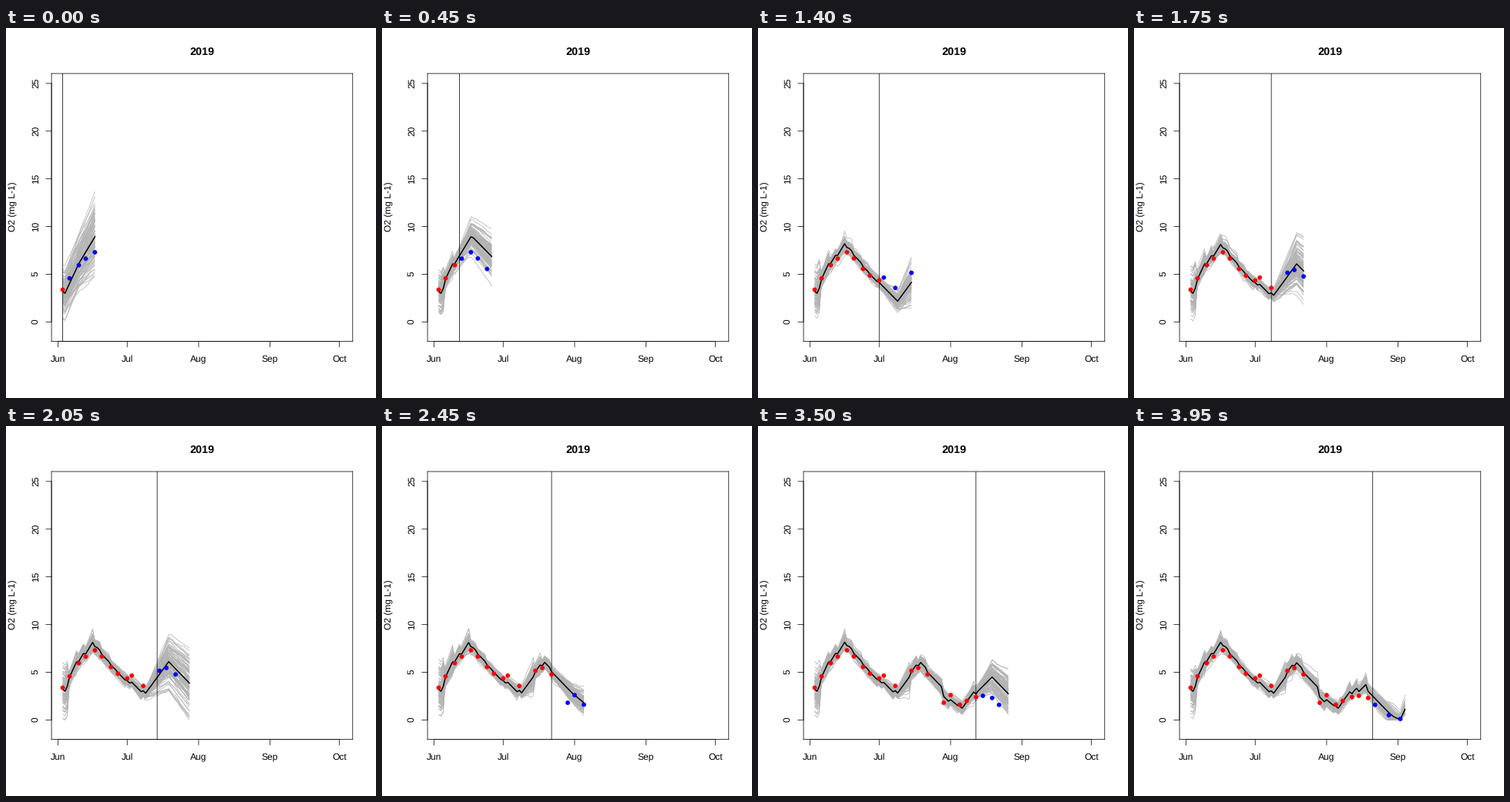
Write a matplotlib script that moves like this. It is 480x480 px and loops after 4000 ms.

```python
import numpy as np
import matplotlib.pyplot as plt
from matplotlib.animation import FuncAnimation
from matplotlib.collections import LineCollection
from matplotlib.lines import Line2D

plt.rcParams.update({"font.family": "Liberation Sans", "font.size": 12,
                     "text.hinting": "none", "path.snap": False})

SIZE, DPI = 480, 72
FRAMES, INTERVAL = 80, 50
LEFT, RIGHT, TOP, BOTTOM = 59.04, 449.76, 59.04, 406.56
THIN, TICK = 0.75, 7.2

# Days are counted from 1 June.
START, HORIZON, MEMBERS = 2, 14, 100
X0, X1, Y0, Y1 = START - 4.84, START + 125.84, -2.04, 26.04
MONTHS = {"Jun": 0, "Jul": 30, "Aug": 61, "Sep": 92, "Oct": 122}

OBS = {2: 3.38, 5: 4.57, 9: 5.95, 12: 6.63, 16: 7.3, 19: 6.65, 23: 5.55,
       26: 4.85, 30: 4.35, 32: 4.65, 37: 3.57, 44: 5.15, 47: 5.45, 51: 4.77,
       58: 1.8, 61: 2.6, 65: 1.6, 68: 2.0, 72: 2.4, 75: 2.53, 79: 2.3,
       82: 1.58, 88: 0.5, 93: 0.1}

# Model phases: last day and daily change in oxygen.
PHASES = [(3, -0.2), (9, 0.52), (16, 0.4), (17, -0.1), (38, -0.245),
          (48, 0.33), (60, -0.25), (66, -0.2), (73, 0.33), (79, 0.24),
          (93, -0.25), (96, 0.52)]
START_MEAN, START_SD, OBS_SD = 3.2, 1.15, 0.42


def simulate(now):
    """Ensemble Kalman filter up to now, free forecast after; rows are days."""
    rng = np.random.default_rng(now)

    def noise(sd):
        z = rng.standard_normal(MEMBERS)
        return sd * (z - z.mean())

    x = np.maximum(START_MEAN + noise(START_SD), 0)
    bias, rows = noise(1), [x]
    for day in range(START + 1, now + HORIZON + 1):
        rate = next(r for end, r in PHASES if day <= end)
        growth = 0.11 if rate > 0 else 0.035
        x = x + rate + growth * bias + noise(0.07)
        if day in OBS and day <= now:
            gain = x.var() / (x.var() + OBS_SD**2)
            x = x + gain * (OBS[day] + noise(OBS_SD) - x)
            bias = noise(1)
        x = np.maximum(x, 0)
        rows.append(x)
    return np.array(rows)


def px(day):
    return LEFT + (day - X0) / (X1 - X0) * (RIGHT - LEFT)


def py(value):
    return BOTTOM - (value - Y0) / (Y1 - Y0) * (BOTTOM - TOP)


def rule(xa, ya, xb, yb):
    fig.add_artist(Line2D([xa / SIZE, xb / SIZE], [1 - ya / SIZE, 1 - yb / SIZE],
                          color="black", lw=THIN))


def label(x, y, text, **kw):
    fig.text(x / SIZE, 1 - y / SIZE, text, ha="center", va="baseline",
             rotation_mode="anchor", **kw)


fig = plt.figure(figsize=(SIZE / DPI, SIZE / DPI), dpi=DPI, facecolor="white")
ax = fig.add_axes([LEFT / SIZE, 1 - BOTTOM / SIZE,
                   (RIGHT - LEFT) / SIZE, (BOTTOM - TOP) / SIZE])
ax.set(xlim=(X0, X1), ylim=(Y0, Y1), xticks=[], yticks=[])
for spine in ax.spines.values():
    spine.set_linewidth(THIN)

rule(px(0), BOTTOM, px(122), BOTTOM)
for name, day in MONTHS.items():
    rule(px(day), BOTTOM, px(day), BOTTOM + TICK)
    label(px(day), 432.8, name)
rule(LEFT, py(0), LEFT, py(25))
for v in range(0, 26, 5):
    rule(LEFT, py(v), LEFT - TICK, py(v))
    label(41.8, py(v) - 0.7, str(v), rotation=90)
label(13, (TOP + BOTTOM) / 2 - 0.7, "O2 (mg L-1)", rotation=90)
label((LEFT + RIGHT) / 2, 35, "2019", fontsize=14.4, fontweight="bold")

members = LineCollection([], colors="#b3b3b3", linewidths=THIN, zorder=2)
ax.add_collection(members, autolim=False)
now_line = ax.axvline(START, color="black", lw=THIN, zorder=3)
mean_line, = ax.plot([], [], color="black", lw=1.5, zorder=3)
dots = ax.scatter([], [], s=5.8**2, lw=0, zorder=4)


def update(frame):
    now = START + frame
    runs = simulate(now)
    days = np.arange(START, now + HORIZON + 1)
    members.set_segments([np.column_stack([days, run]) for run in runs.T])
    mean_line.set_data(days, runs.mean(axis=1))
    now_line.set_xdata([now, now])
    shown = [(d, v) for d, v in OBS.items() if d <= now + HORIZON]
    dots.set_offsets(shown)
    dots.set_facecolors(["red" if d <= now else "blue" for d, _ in shown])
    return members, now_line, mean_line, dots


anim = FuncAnimation(fig, update, frames=FRAMES, interval=INTERVAL,
                     repeat=True, repeat_delay=0)
plt.show()
```
